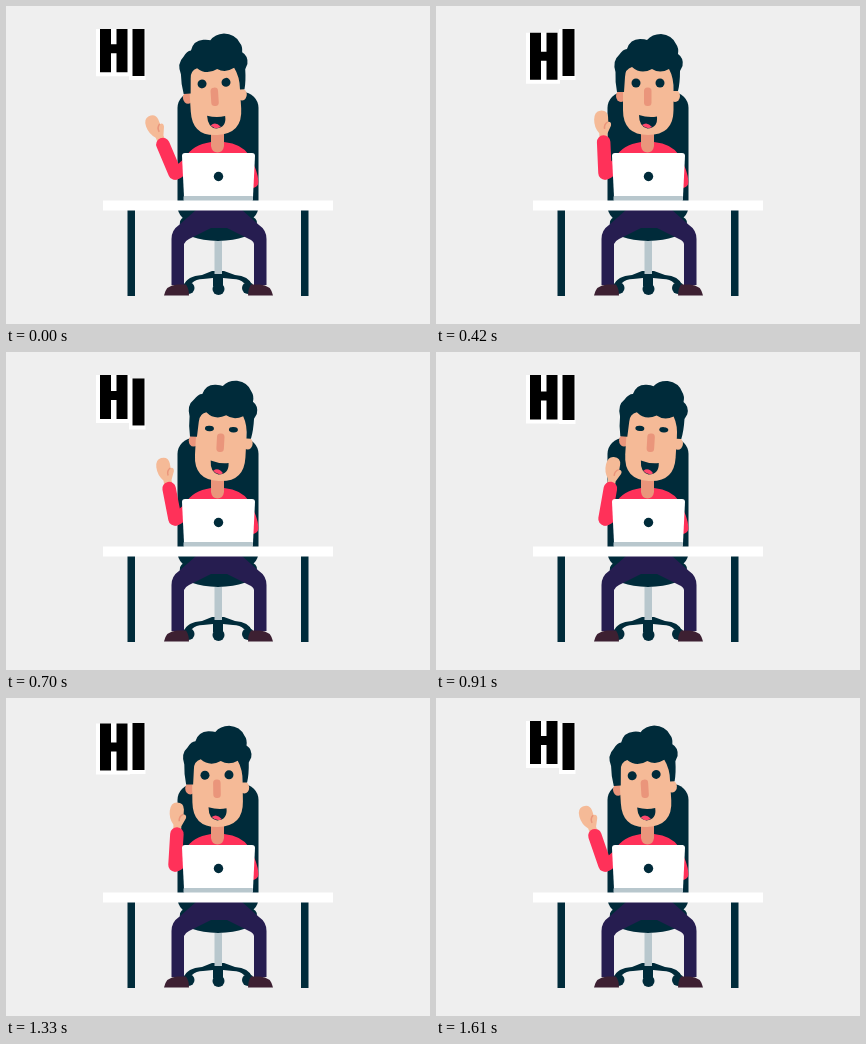
An HTML page that plays this animation: 424x318 px, repeating every 1680 ms.

```html
<!DOCTYPE html>
<html lang="en">
<head>
<meta charset="utf-8">
<title>Hi</title>
<style>
  html, body { margin: 0; width: 100%; height: 100%; overflow: hidden; background: #efefef; }
  svg { display: block; width: 100vw; height: 100vh; }
  .dark { fill: #002b3a; }
  .navy { fill: #261d50; }
  .shoe { fill: #3d2032; }
  .red { fill: #ff3159; }
  .skin { fill: #f5ba97; }
  .shade { fill: #ea957b; }
  .white { fill: #fff; }
  .grey { fill: #b8c7cd; }
</style>
</head>
<body>
<svg viewBox="0 0 424 318">
  <defs>
    <clipPath id="top"><path d="M88 23H142V82H88Z"/></clipPath>
    <path id="shoe" d="M158 289.500Q160 279 171 278.500H180Q183 283 183 289.500Z"/>
  </defs>

  <g clip-path="url(#top)">
    <g id="h">
      <path class="white" d="M90 0H124V51H90Z"/>
      <path d="M94 0H105V19H110.500V0H121.500V47H110.500V28H105V47H94Z"/>
    </g>
    <g id="i">
      <path class="white" d="M123 0H139.500V51H123Z"/>
      <path d="M126.500 0H138.500V47H126.500Z"/>
    </g>
  </g>

  <!-- chair -->
  <g class="dark">
    <rect x="171.500" y="86" width="81" height="130" rx="16"/>
    <path d="M178 211H247Q253 214 250 221Q245 234 212 235Q180 234 174.500 221Q172 214 178 211Z"/>
    <path d="M178 279Q181 270 196 269L206 265H218L229 269Q243 270 246 279L238 277Q234 273 227 273L217 272V280H207V272L197 273Q190 273 186 277Z"/>
    <circle cx="182.500" cy="282" r="6"/>
    <circle cx="212.500" cy="283" r="6"/>
    <circle cx="242" cy="282" r="6"/>
  </g>
  <rect class="grey" x="208.500" y="235" width="7.500" height="33"/>

  <!-- legs -->
  <path class="navy" d="M190 204L173 219Q165.500 224 165.500 233V279H178V238Q179 235 183 233L205 222H221L243 233Q247.500 235 248 238V279H260.500V233Q260.500 224 253 219L236 204Z"/>
  <use href="#shoe" class="shoe"/>
  <use href="#shoe" class="shoe" transform="matrix(-1 0 0 1 425 0)"/>

  <!-- torso and waving arm -->
  <path class="red" d="M180 195V167Q174 175 167 173L163 166L180 151Q186 139 205 136H218Q236 138 243 149Q252 165 252.500 176Q252 182 245 182V195Z"/>
  <path class="shade" d="M205 120H218V140Q217 146.500 211.500 146.500Q206 146.500 205 140Z"/>
  <g id="arm">
    <path class="skin" d="M165 136V127Q160 121 160.500 113Q161 105 167 104.500Q174 104 174.500 111V116Q178 116 177 120L173 128V136Z"/>
    <path d="M174 116Q170 118 170.500 123" fill="none" stroke="#ea957b" stroke-width="1.500"/>
    <path d="M169 167V136" fill="none" stroke="#ff3159" stroke-width="13.500" stroke-linecap="round"/>
  </g>

  <g id="head">
    <ellipse class="shade" cx="185" cy="90" rx="5" ry="6"/>
    <ellipse class="skin" cx="239" cy="90" rx="5" ry="6"/>
    <path class="skin" d="M187 56H237.500V104Q237.500 129 212 129Q187 129 187 104Z"/>
    <path class="dark" d="M188 86H181Q179 76 179.500 66Q176 55 183 49Q187 43 191 43Q194 33 204 33Q209 33 211 34Q216 28 225 28Q236 29 240 38Q243 42 242 48Q248 52 246.500 60Q245 63 244 65Q244 77 242 85H237.500Q238 72 233 63Q224 68 216 63Q205 69 196 61Q189 63 189 71Z"/>
    <g class="dark" id="eyes">
      <circle cx="200" cy="0" r="4.500"/>
      <circle cx="224" cy="0" r="4.500"/>
    </g>
    <rect class="shade" x="208" y="81.500" width="7.500" height="18.500" rx="3.500"/>
    <path class="dark" d="M203 109Q212 112 221 110.500Q222 122 211.500 122.500Q203 121 203 109Z"/>
    <path fill="#ff476d" d="M206 119Q211 115 216 121Q211 124 206 119Z"/>
  </g>

  <!-- laptop and desk -->
  <path class="white" d="M179 147H246Q249 147 249 150L247 191H178L176 150Q176 147 179 147Z"/>
  <rect class="grey" x="177.500" y="190" width="69.500" height="5" rx="1"/>
  <circle class="dark" cx="212.500" cy="170.500" r="4.700"/>
  <path class="dark" d="M121.500 204H129V290H121.500ZM295 204H302.500V290H295Z"/>
  <rect class="white" x="97" y="194.500" width="230" height="10"/>
</svg>
<script>
  const STEP = 70, STEPS = 24;
  const WAVE = [-23, -23, -11, 3.5, 10.5, 10, -2.5, -19];
  const part = id => document.getElementById(id);
  const [h, i, arm, head, eyes] = ['h', 'i', 'arm', 'head', 'eyes'].map(part);
  const move = (el, value) => el.setAttribute('transform', value);
  const cycle = (k, period) => Math.cos(2 * Math.PI * k / period);
  const bob = (k, highest) => `translate(0 ${23 - 4 * cycle(k - highest, 12)})`;

  function draw(now) {
    const k = Math.floor(now / STEP) % STEPS;
    const blink = Math.min(1, Math.max(0.12, Math.abs(k - 11.5) / 2.5));
    move(h, bob(k, 11.3));
    move(i, bob(k, 3));
    move(arm, `rotate(${WAVE[k % 8]} 169 167)`);
    move(head, `rotate(${-3.6 * cycle(k, STEPS)} 212 140)`);
    move(eyes, `translate(0 77) scale(1 ${blink})`);
    requestAnimationFrame(() => draw(performance.now() - start));
  }

  const start = performance.now();
  draw(0);
</script>
</body>
</html>
```
